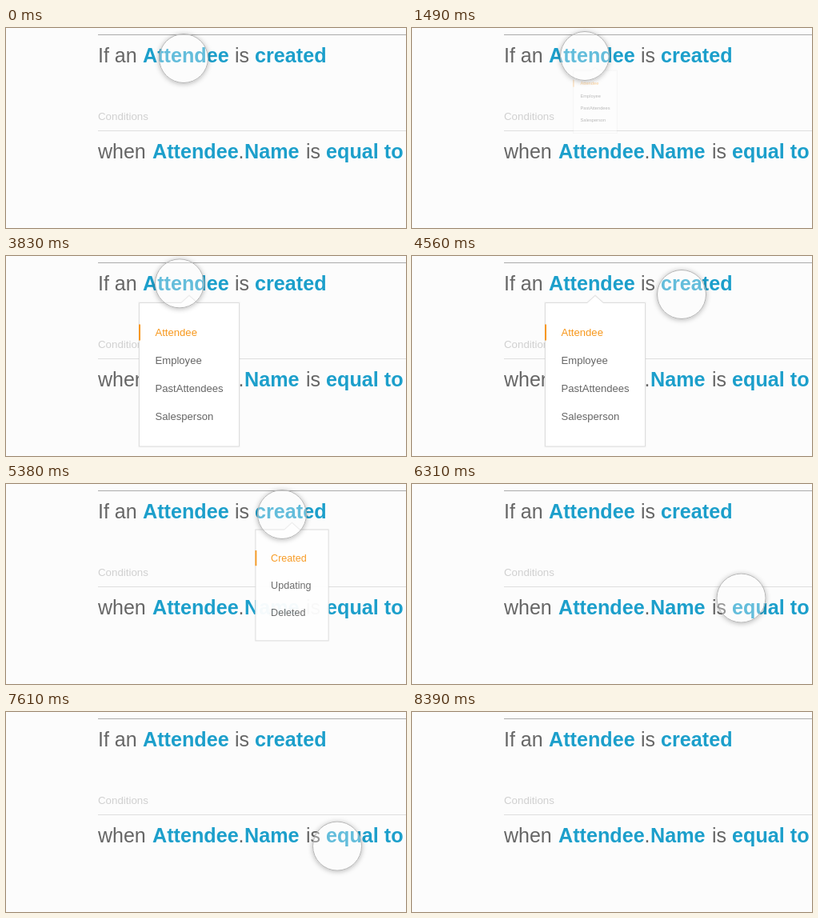
An HTML page for the animation above (8460 ms loop, 500 by 250 pixels).

```html
<!DOCTYPE html>
<html lang="en">
<head>
<meta charset="utf-8">
<title>Rule editor</title>
<style>
  html, body { margin: 0; width: 100%; height: 100%; overflow: hidden; background: #fcfcfc; }
  .stage { position: relative; width: 500px; height: 250px; overflow: hidden; }
  svg { position: absolute; inset: 0; font-family: "Liberation Sans", Arial, sans-serif; }
  .rule { font-size: 25px; fill: #666; }
  .key { font-size: 25.2px; font-weight: bold; fill: #1c9fcb; }
  .label { font-size: 13.3px; fill: #d0d0d0; }
  .menu { font-size: 13.1px; fill: #666; }
  .menu .on { fill: #f7981d; }
  .frame { fill: #fff; stroke: #dedede; }
  .shade { fill: none; stroke: #000; stroke-opacity: .04; stroke-width: 2.5; }
  #cursor {
    position: absolute; left: -31px; top: -31px; width: 62px; height: 62px;
    box-sizing: border-box; border: 1px solid #b4b4b4; border-radius: 50%;
    background: rgba(252, 252, 252, .32);
    box-shadow: 0 1px 6px rgba(0, 0, 0, .28);
  }
</style>
</head>
<body>
<div class="stage">
  <svg width="500" height="250" viewBox="0 0 500 250">
    <path d="M115 8.5H500" stroke="#ababab"/>
    <path d="M115 128.5H500" stroke="#dedede"/>
    <text y="43" class="rule">
      <tspan x="115">If an</tspan>
      <tspan x="171" class="key">Attendee</tspan>
      <tspan x="286">is</tspan>
      <tspan x="311" class="key">created</tspan>
    </text>
    <text x="115" y="115" class="label">Conditions</text>
    <text y="163" class="rule">
      <tspan x="115">when</tspan>
      <tspan x="183" class="key">Attendee</tspan>
      <tspan x="290.5">.</tspan>
      <tspan x="298" class="key">Name</tspan>
      <tspan x="375">is</tspan>
      <tspan x="400" class="key">equal to</tspan>
    </text>
    <g id="menus"></g>
  </svg>
  <div id="cursor"></div>
</div>
<script>
const LOOP = 8460, CURSOR_GONE = 8390;
const ROW = 35, MOVE = 350, SHRINK = 55;

// x, y: arrow tip and scaling origin; shows: open and close times
const menus = [
  { x: 229, y: 49, width: 125, items: ['Attendee', 'Employee', 'PastAttendees', 'Salesperson'],
    shows: [[145, 1460], [1985, 2795], [3175, 4920]] },
  { x: 357.5, y: 48, width: 95, items: ['Created', 'Updating', 'Deleted'],
    shows: [[5302, 5865], [6970, 7500]] }
];

// Cursor stops: time of departure towards x, y
const stops = [
  [-MOVE, 222, 38],
  [710, 216, 35],
  [1820, 214, 34],
  [3800, 348, 50],
  [4210, 337, 48],
  [4560, 345, 38],
  [6120, 462, 222],
  [6470, 356, 30],
  [7400, 445, 241],
  [7810, 470, 262]
];

const cursor = document.getElementById('cursor');
const layer = document.getElementById('menus');

const spring = t => 1 - Math.exp(-t / 42) * Math.cos(.0165 * t);
const smooth = p => p * p * (3 - 2 * p);
const clamp = p => Math.max(0, Math.min(1, p));

function build(menu) {
  const g = document.createElementNS('http://www.w3.org/2000/svg', 'g');
  const right = menu.width / 2, left = -right;
  const top = 9.5, bottom = top + ROW * (menu.items.length + 1) + 4.5;
  const outline = `M${left} ${top}H-10L0 .5L10 ${top}H${right}V${bottom}H${left}Z`;
  const text = (item, i) =>
    `<text x="${left + 20}" y="${51.4 + ROW * i}" class="${i ? '' : 'on'}">${item}</text>`;
  g.setAttribute('class', 'menu');
  g.innerHTML = `<path class="shade" d="${outline}"/><path class="frame" d="${outline}"/>` +
    `<rect class="on" x="${left - .5}" y="36.5" width="2" height="20"/>` +
    menu.items.map(text).join('');
  layer.append(g);
  menu.node = g;
}

function drawMenu({ node, x, y, shows }, t) {
  const show = shows.find(([open, close]) => t >= open && t < close + SHRINK);
  node.style.display = show ? '' : 'none';
  if (!show) return;
  const [open, close] = show;
  const left = 1 - clamp((t - close) / SHRINK);
  node.setAttribute('transform', `translate(${x} ${y}) scale(${spring(t - open) * left})`);
  node.setAttribute('opacity', (1 - Math.exp((open - t) / 25)) * left);
}

function drawCursor(t) {
  let x = 0, y = 0;
  for (const [start, toX, toY] of stops) {
    const u = smooth(clamp((t - start) / MOVE));
    x += (toX - x) * u;
    y += (toY - y) * u;
  }
  cursor.style.transform = `translate(${x}px, ${y}px)`;
  cursor.style.visibility = t < CURSOR_GONE ? 'visible' : 'hidden';
}

menus.forEach(build);
const began = performance.now();
function tick() {
  const t = (performance.now() - began) % LOOP;
  menus.forEach(menu => drawMenu(menu, t));
  drawCursor(t);
  requestAnimationFrame(tick);
}
tick();
</script>
</body>
</html>
```
